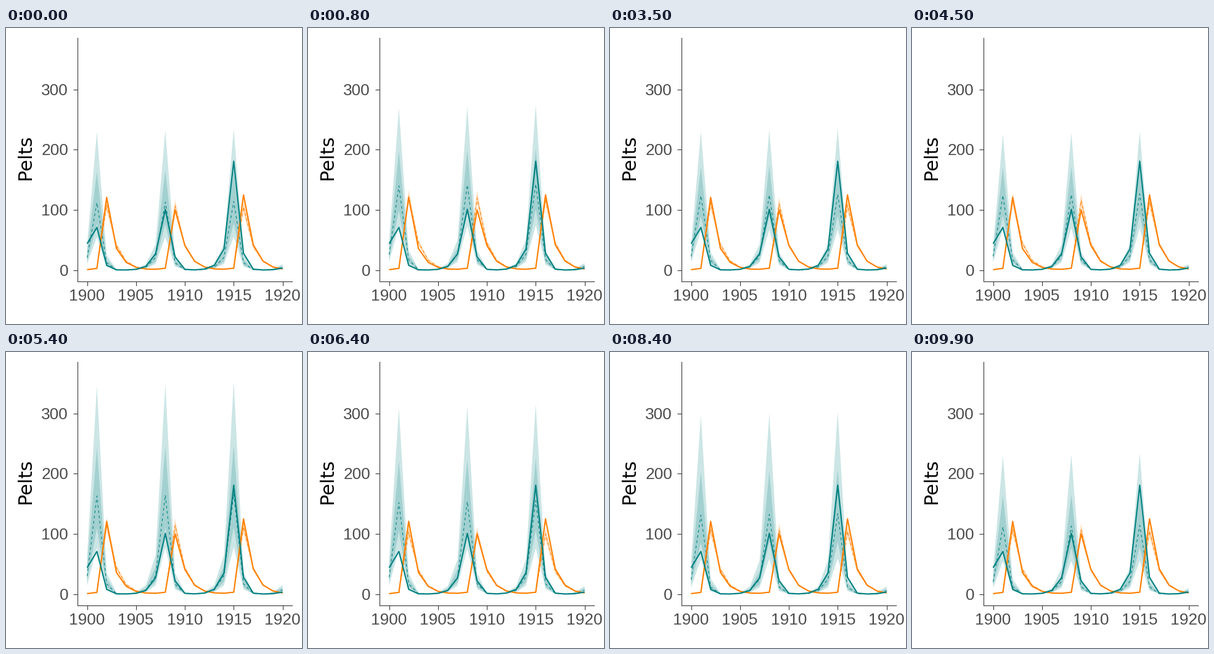
Write a matplotlib script that moves like this. It is 480x480 px and loops after 10000 ms.

```python
import numpy as np
import matplotlib.pyplot as plt
from matplotlib.animation import FuncAnimation
from matplotlib.patches import Polygon

SIZE, DPI, FRAMES = 480, 72, 100
TEAL, ORANGE, AXIS = "#008080", "#ff8000", "#333333"
YEARS = np.arange(1900, 1921)
CYCLE = 7

# One key per state: teal peak median, its log spread, orange peak median
MEDIANS = [112, 154, 114, 125, 116, 165, 153, 148, 133, 122]
SPREADS = [0.72, 0.63, 0.55, 0.64, 0.55, 0.76, 0.71, 0.70, 0.83, 0.75]
HUNTERS = [108, 128, 104, 110, 117, 118, 103, 104, 108, 107]
STATES = len(MEDIANS)
LEVELS = np.array([-1, -0.53, 0, 0.53, 1])


def swing(first, peaks, lead, tail, rise, fall):
    """Peaks every cycle, with geometric growth before and decay after."""
    total = np.zeros(len(YEARS))
    for n, (peak, before, after) in enumerate(zip(peaks, lead, tail)):
        d = YEARS - first - CYCLE * n
        total += np.where(d < 0, before * rise ** (abs(d) - 1.0),
                          np.where(d > 0, after * fall ** (abs(d) - 1.0), peak))
    return total


def prey(peaks, lead, tail):
    return swing(1901, peaks, lead, tail, rise=0.23, fall=0.06)


def hunter(peaks, lead, tail):
    return swing(1902, peaks, lead, tail, rise=0.3, fall=0.36)


def quantiles(wave, median, spread, growth, lead, tail):
    """Log-normal quantile curves of one species."""
    peaks = np.outer(median * np.exp(spread * LEVELS), growth ** np.arange(4))
    return np.array([wave(p, lead * p, tail * p) for p in peaks])


def curves(median, spread, top):
    teal = quantiles(prey, median, spread, 1.01, 0.185, 0.26 - 0.21 * spread)
    orange = quantiles(hunter, top, 0.1, 0.985, 0.027, 0.38)
    return np.array([teal, orange])


KEYS = [curves(*key) for key in zip(MEDIANS, SPREADS, HUNTERS)]


def pose(frame):
    """Hold a state, then move to the next in six even steps."""
    ends = [round((FRAMES - 1) / STATES * k) for k in range(1, STATES + 1)]
    k = next(k for k, end in enumerate(ends) if frame <= end)
    t = np.clip((frame - ends[k] + 6) / 6, 0, 1)
    return KEYS[k] + (KEYS[(k + 1) % STATES] - KEYS[k]) * t


fig = plt.figure(figsize=(SIZE / DPI, SIZE / DPI), dpi=DPI, facecolor="white")
LEFT, RIGHT, TOP, BOTTOM = 115.7, 464.4, 16, 410.5
ax = fig.add_axes([LEFT / SIZE, 1 - BOTTOM / SIZE,
                   (RIGHT - LEFT) / SIZE, (BOTTOM - TOP) / SIZE])
ax.set_xlim(1899, 1921)
ax.set_ylim(-18.2, 385.8)
ax.set_xticks(range(1900, 1921, 5))
ax.set_yticks(range(0, 301, 100))
ax.tick_params(length=7.3, width=1.07, color=AXIS,
               labelbottom=False, labelleft=False)
plt.setp(ax.get_xticklines() + ax.get_yticklines(), snap=False)
for side, spine in ax.spines.items():
    spine.set_visible(side in ("left", "bottom"))
    spine.set(linewidth=1.07, edgecolor=AXIS)


def label(x, y, text, size, font="Liberation Sans", color="#4d4d4d", **kw):
    fig.text(x / SIZE, 1 - y / SIZE, text, fontsize=size, family=font,
             color=color, va="baseline", **kw)


for n, year in enumerate(range(1900, 1921, 5)):
    label(131.3 + 79.2 * n, 442.5, str(year), 26.3, ha="center")
for n in range(4):
    label(101, 401.5 - 97.6 * n, str(100 * n), 26.3, ha="right")
label(39.7, 209.5, "Pelts", 30.6, "DejaVu Sans", "black", ha="center",
      rotation=90, rotation_mode="anchor")


def ribbon(color):
    shape = Polygon([(0, 0), (1, 0), (1, 1)], closed=True, facecolor=color,
                    alpha=0.2, linewidth=0, zorder=1)
    return ax.add_patch(shape)


def outline(low, high):
    return np.column_stack([np.r_[YEARS, YEARS[::-1]], np.r_[low, high[::-1]]])


bands, medians = [], []
for color in (TEAL, ORANGE):
    bands.append((ribbon(color), ribbon(color)))
    medians += ax.plot(YEARS, 0 * YEARS, color=color, lw=1.07,
                       dashes=(4, 4), zorder=2)

# Observed pelts: peak, year before and year after of each cycle
seen_hunter = hunter([121, 100, 125], [3, 3, 3], [36, 41, 42])
seen_prey = prey([71, 101, 181, 100], [44, 27, 35, 15], [8, 22, 28, 15])
for seen, color in ((seen_hunter, ORANGE), (seen_prey, TEAL)):
    ax.plot(YEARS, seen, color=color, lw=2.13, solid_capstyle="butt", zorder=3)


def update(frame):
    for q, (outer, inner), median in zip(pose(frame), bands, medians):
        outer.set_xy(outline(q[0], q[4]))
        inner.set_xy(outline(q[1], q[3]))
        median.set_ydata(q[2])
    return medians


anim = FuncAnimation(fig, update, frames=FRAMES, interval=100,
                     repeat=True, repeat_delay=0, blit=False)
plt.show()
```
